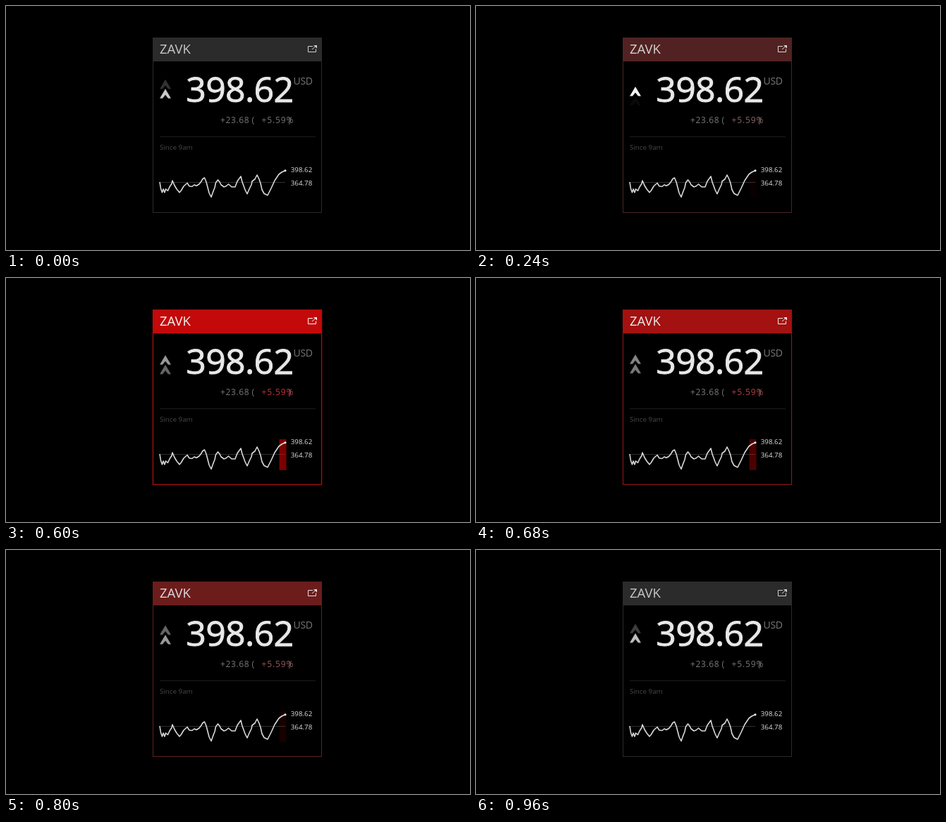
Write an HTML page that moves like this. It is 658 by 348 pixels and loops after 1000 ms.

```html
<!DOCTYPE html>
<html lang="en">
<head>
<meta charset="utf-8">
<title>Stock ticker card</title>
<style>
@property --r { syntax: "<number>"; inherits: true; initial-value: 0; }

html, body { margin: 0; width: 100%; height: 100%; overflow: hidden; background: #000; }

.stage {
  position: relative; width: 658px; height: 348px; overflow: hidden;
  animation: flash 1s infinite;
  --p: calc(var(--r) * 100%);
  --glow: calc(var(--r) * var(--r) * var(--r));
}

.card {
  position: absolute; left: 208px; top: 45px; width: 240px; height: 250px;
  box-sizing: border-box; background: #000;
  border: 1px solid color-mix(in srgb, #c80c0c var(--p), #2b2b2b);
  box-shadow:
    0 0 2px rgb(238 0 0 / calc(var(--glow) * .6)),
    0 calc(var(--glow) * 3px) calc(var(--glow) * 6px) rgb(238 0 0 / calc(var(--glow) * .4)),
    inset 0 0 2px rgb(238 0 0 / calc(var(--glow) * .6));
}

svg { position: absolute; left: 0; top: 0; }
text { font-family: "Open Sans", "Noto Sans", sans-serif; fill: #777; white-space: pre; }

.head { fill: color-mix(in srgb, #ee0000 var(--p), #2b2b2b); }
.name { font-size: 18.5px; fill: color-mix(in srgb, #fff var(--p), #c8c8c8); }
.icon { --ink: color-mix(in srgb, #fff var(--p), #d0d0d0); fill: none; stroke: var(--ink); }
.icon .tip { fill: var(--ink); stroke: none; }
.price {
  font-size: 50px; letter-spacing: -.7px;
  fill: #e8e8e8; stroke: #e8e8e8; stroke-width: .9;
}
.unit { font-size: 14px; letter-spacing: -.3px; }
.delta { font-size: 12px; letter-spacing: .6px; }
.pct { letter-spacing: .85px; fill: color-mix(in srgb, #d8202a var(--p), #777); }
.since { font-size: 9.8px; fill: #484848; }
.mark { font-size: 9.8px; fill: #e0e0e0; }
.bar { fill: #f00; opacity: calc(var(--r) * var(--r) * .79); }
.line { fill: none; stroke: #d8d8d8; stroke-width: 1.6; stroke-linejoin: round; }

.arrow { fill: #fff; animation: 1s steps(25) -.8s infinite; }
.leaving { animation-name: leave; }
.coming { animation-name: come; }

@keyframes leave {
  from { transform: translate(226px, 115.5px); opacity: 1; }
  to { transform: translate(226px, 102px); opacity: 0; }
}
@keyframes come {
  from { transform: translate(226px, 129px); opacity: 0; }
  to { transform: translate(226px, 115.5px); opacity: 1; }
}
@keyframes flash {
  0% { --r: 0; }
  20% { --r: 0; animation-timing-function: steps(5); }
  40% { --r: 1; }
  44% { --r: 1; animation-timing-function: steps(4); }
  60% { --r: .78; animation-timing-function: steps(3); }
  72% { --r: .53; animation-timing-function: steps(2); }
  80% { --r: .34; animation-timing-function: steps(4); }
  96%, 100% { --r: 0; }
}
</style>
</head>
<body>
<div class="stage">
  <div class="card"></div>
  <svg width="658" height="348" viewBox="0 0 658 348">
    <rect class="head" x="209" y="46" width="238" height="33"/>
    <text class="name" x="218" y="68">ZAVK</text>
    <g class="icon">
      <path d="M435 57.5H428.5V65.5H439.5V61.5M434 62L438.5 58"/>
      <path class="tip" d="M436 56H441V60.5Z"/>
    </g>

    <path class="arrow leaving" d="M0 0L8 13.5H4L0 8.5L-4 13.5H-8Z"/>
    <path class="arrow coming" d="M0 0L8 13.5H4L0 8.5L-4 13.5H-8Z"/>

    <text class="price" x="255.3" y="137">398.62</text>
    <text class="unit" x="407.5" y="112">USD</text>
    <text class="delta" x="304" y="167">+23.68</text>
    <text class="delta" x="348.5" y="167">(</text>
    <text class="delta pct" x="362.5" y="167">+5.59%</text>
    <text class="delta" x="400.5" y="167">)</text>

    <rect x="218" y="186" width="221" height="1" fill="#1c1c1c"/>
    <text class="since" x="218" y="205">Since 9am</text>

    <rect x="218" y="251" width="178" height="1" fill="#303030"/>
    <rect class="bar" x="387.5" y="230" width="10" height="44"/>
    <polyline class="line" points="218,251 219.5,260.5 221.5,266 223,261 225,266 226.5,261 229.5,263.5
      232,258 235,253.5 236,249 239,256 242,261 246,266 248.5,263 252,257 257,252.5 260,257 264,257.5
      267,255 270,256.5 274,254 277,250 279,246.5 281.5,245 284,251 288,266.5 291,272.5 294,264
      296,259 297.5,252 300.5,248 303,251 305,255 309,258 312,257 315.5,254 320,258 325,258
      328,250 333,243 335,251 339,262 342,268 345,261 348,255 349,250 353,247 356,241 359,247
      361,253 363,262 366,267.5 371,270 376,260 381,249 387,240 391,237 396,234.7"/>
    <circle cx="396" cy="234.7" r="1.5" fill="#fff"/>
    <text class="mark" x="403.7" y="237">398.62</text>
    <text class="mark" x="403.7" y="256">364.78</text>
  </svg>
</div>
</body>
</html>
```
